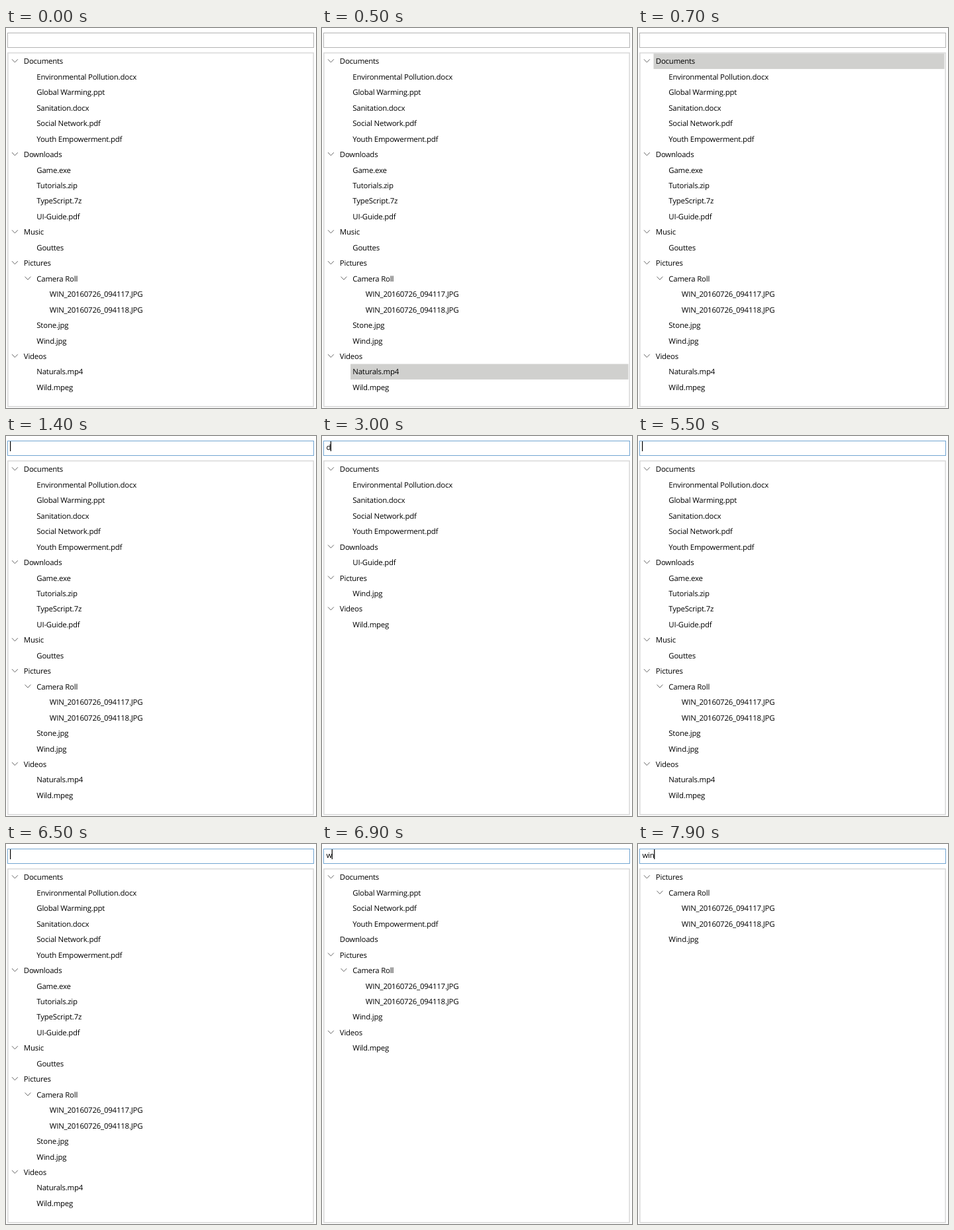
An HTML page for the animation above (8 s loop, 468 px wide and 574 px high).

```html
<!DOCTYPE html>
<html lang="en">
<head>
<meta charset="utf-8">
<title>Tree filter</title>
<style>
  html, body { margin: 0; width: 100%; height: 100%; overflow: hidden; background: #fff; }
  svg { display: block; width: 468px; height: 574px; }
  text {
    font: 11.4px "Open Sans", "Noto Sans", sans-serif;
    letter-spacing: -.19px;
    fill: #000;
    white-space: pre;
    text-rendering: geometricPrecision;
  }
  .box { fill: #fff; stroke: #b4b4b4; }
  .box.hover { stroke: #8ab8e0; }
  .box.focus { stroke: #72a6d2; }
  .panel { fill: #fff; stroke: #dadada; stroke-width: 1.6; }
  .mark { fill: #d0d0ce; }
  .arrow { fill: none; stroke: #555; stroke-width: .9; }
</style>
</head>
<body>
<svg viewBox="0 0 468 574">
  <rect id="box" class="box" x="2.5" y="7.5" width="462" height="22"/>
  <text id="query" x="6.4" y="20.5"></text>
  <rect id="caret" y="8" width="1.2" height="15"/>
  <rect class="panel" x="2.8" y="37.6" width="461.4" height="534.2"/>
  <g id="rows"></g>
</svg>
<script>
const LOOP = 8000, PITCH = 23.45, INDENT = 19.5;

const TREE = [
  ["Documents", ["Environmental Pollution.docx", "Global Warming.ppt", "Sanitation.docx",
    "Social Network.pdf", "Youth Empowerment.pdf"]],
  ["Downloads", ["Game.exe", "Tutorials.zip", "TypeScript.7z", "UI-Guide.pdf"]],
  ["Music", ["Gouttes"]],
  ["Pictures", [["Camera Roll", ["WIN_20160726_094117.JPG", "WIN_20160726_094118.JPG"]],
    "Stone.jpg", "Wind.jpg"]],
  ["Videos", ["Naturals.mp4", "Wild.mpeg"]]
];

// Each step changes only the listed properties.
const STEPS = [
  [0, { query: "", caret: false, border: "", hover: -1 }],
  [500, { hover: 20 }],
  [600, { hover: 12 }],
  [700, { hover: 0 }],
  [900, { hover: -1, border: "hover" }],
  [1400, { border: "focus", caret: true }],
  [2000, { caret: false }],
  [2400, { caret: true }],
  [3000, { query: "d" }],
  [3500, { query: "do" }],
  [3900, { query: "doc" }],
  [4500, { caret: false }],
  [4800, { query: "do", caret: true }],
  [5200, { query: "d" }],
  [5500, { query: "" }],
  [6000, { caret: false }],
  [6500, { caret: true }],
  [6700, { query: "w" }],
  [7100, { query: "wi" }],
  [7700, { caret: false }],
  [7900, { query: "win", caret: true }]
];

const byId = id => document.getElementById(id);
const box = byId("box"), query = byId("query"), caret = byId("caret"), rows = byId("rows");

function add(tag, attrs, label = "") {
  const el = document.createElementNS("http://www.w3.org/2000/svg", tag);
  for (const key in attrs) el.setAttribute(key, attrs[key]);
  el.textContent = label;
  rows.append(el);
}

// Flat list of visible nodes: a node stays if it or a descendant matches.
function visible(nodes, term, depth = 0) {
  return nodes.flatMap(node => {
    const [label, children] = Array.isArray(node) ? node : [node, []];
    const inner = visible(children, term, depth + 1);
    const keep = inner.length || label.toLowerCase().includes(term);
    return keep ? [{ label, depth, open: inner.length > 0 }, ...inner] : [];
  });
}

function drawRows(term, hover) {
  rows.replaceChildren();
  visible(TREE, term).forEach(({ label, depth, open }, i) => {
    const x = depth * INDENT, y = 50.4 + i * PITCH;
    if (i === hover) {
      add("rect", { class: "mark", x: x + 23.5, y: y - 11.9, width: 439 - x, height: 23.4 });
    }
    if (open) add("path", { class: "arrow", d: `M${x + 9} ${y - 3.1}l4.4 4.6 4.4-4.6` });
    add("text", { x: x + 26.8, y: y + 4 }, label);
  });
}

function draw(state) {
  box.setAttribute("class", "box " + state.border);
  query.textContent = state.query;
  const width = state.query ? query.getComputedTextLength() : 0;
  caret.setAttribute("x", 6 + width);
  caret.setAttribute("visibility", state.caret ? "visible" : "hidden");
  drawRows(state.query, state.hover);
}

let shown = -1;
function tick() {
  const time = performance.now() % LOOP;
  const past = STEPS.filter(([start]) => start <= time);
  if (past.length !== shown) {
    shown = past.length;
    draw(Object.assign({}, ...past.map(([, change]) => change)));
  }
  requestAnimationFrame(tick);
}
tick();
</script>
</body>
</html>
```
